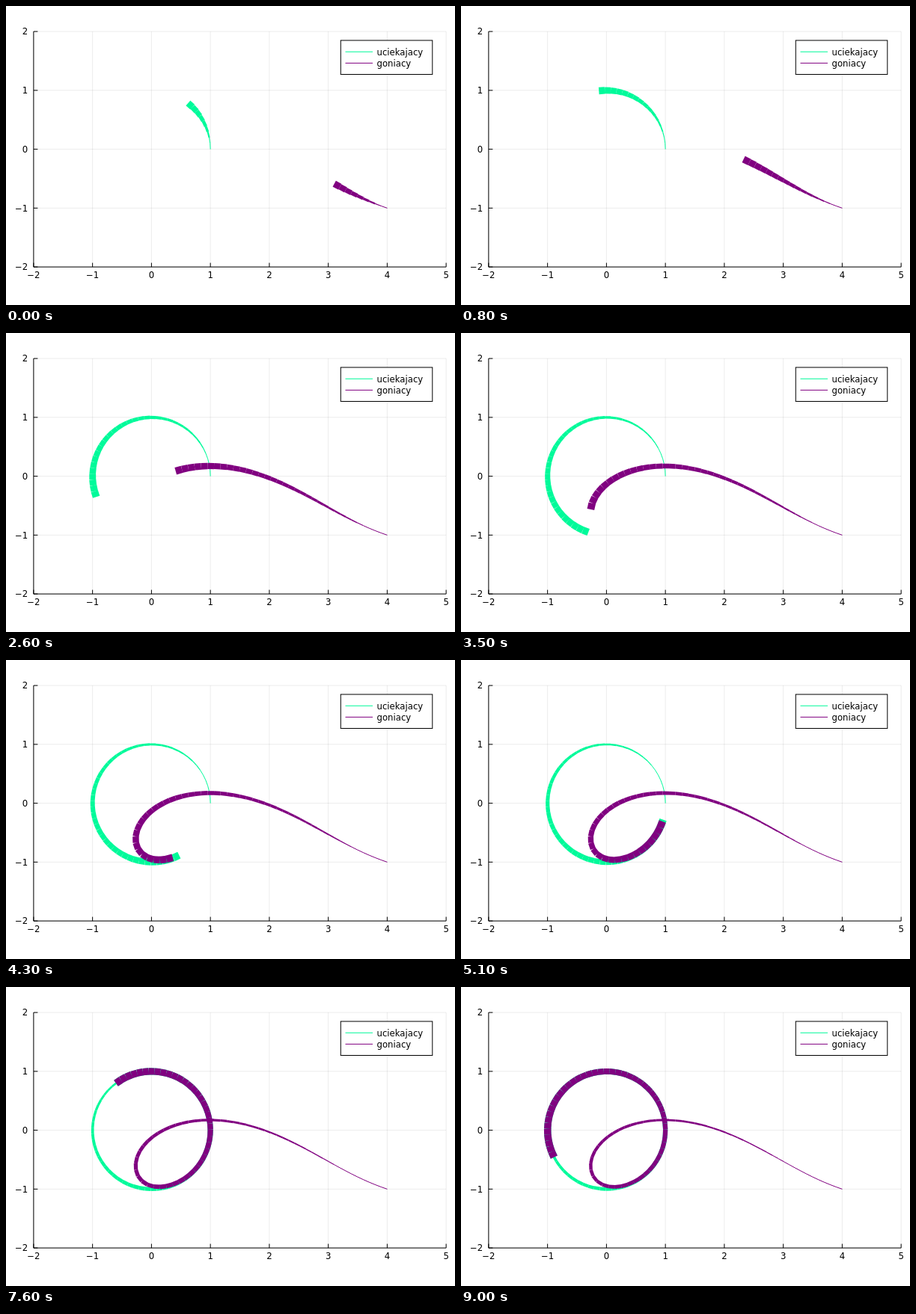
Write an HTML page that moves like this. It is 600 by 400 pixels and loops after 9100 ms.

```html
<!DOCTYPE html>
<html lang="pl">
<head>
<meta charset="utf-8">
<title>Pursuit curve</title>
<style>
  html, body { margin: 0; width: 100%; height: 100%; overflow: hidden; background: #fff; }
  svg { display: block; }
  text { font: 11.7px "DejaVu Sans", sans-serif; fill: #000; }
</style>
</head>
<body>
<svg id="stage" width="600" height="400" viewBox="0 0 600 400"></svg>
<script>
const GREEN = '#00fa9a', PURPLE = '#800080';
const UNIT = 78.75;
const FRAME_MS = 100, FRAMES = 91, FIRST_POINTS = 10;
const DT = 0.1, SPEED = 1.1, MAX_WIDTH = 10;
const stage = document.getElementById('stage');

const px = x => 194.4 + x * UNIT;
const py = y => 191.6 - y * UNIT;

function add(tag, attrs, content) {
  const el = document.createElementNS('http://www.w3.org/2000/svg', tag);
  for (const key in attrs) el.setAttribute(key, attrs[key]);
  if (content !== undefined) el.textContent = content;
  return stage.appendChild(el);
}

const line = (x1, y1, x2, y2, stroke = '#000', opacity = 1) =>
  add('line', { x1, y1, x2, y2, stroke, 'stroke-opacity': opacity });

const label = (x, y, content, anchor = 'start') =>
  add('text', { x, y, 'text-anchor': anchor }, content);

const signed = n => String(n).replace('-', '\u2212');

function drawAxes() {
  const left = px(-2), right = px(5), top = py(2), bottom = py(-2);
  for (let x = -2; x <= 5; x++) line(px(x), top, px(x), bottom, '#000', 0.08);
  for (let y = -2; y <= 2; y++) line(left, py(y), right, py(y), '#000', 0.08);
  line(left, bottom, right, bottom);
  line(left, top, left, bottom);
  for (let x = -2; x <= 5; x++) {
    line(px(x), bottom, px(x), bottom - 5.5);
    label(px(x), 364.3, signed(x), 'middle');
  }
  for (let y = -2; y <= 2; y++) {
    line(left, py(y), left + 5.5, py(y));
    label(29.3, py(y) + 4.3, signed(y), 'end');
  }
}

function drawLegend() {
  add('rect', { x: 447.3, y: 46, width: 122.5, height: 45.5, fill: '#fff', stroke: '#000' });
  [['uciekajacy', GREEN], ['goniacy', PURPLE]].forEach(([name, color], i) => {
    const y = 61.3 + 15.1 * i;
    line(453.5, y, 490, y, color);
    label(495.5, y + 4.4, name);
  });
}

const evader = t => [Math.cos(t), Math.sin(t)];

// The pursuer always heads for the evader at constant speed and sticks to it once caught.
function pursuerPath(count) {
  const substeps = 200, h = DT / substeps;
  const path = [[4, -1]];
  let [x, y] = path[0];
  for (let i = 0; i < (count - 1) * substeps; i++) {
    const [ex, ey] = evader((i + 1) * h);
    const gap = Math.hypot(ex - x, ey - y);
    const move = gap > 0 ? Math.min(1, SPEED * h / gap) : 0;
    x += (ex - x) * move;
    y += (ey - y) * move;
    if ((i + 1) % substeps === 0) path.push([x, y]);
  }
  return path;
}

const makeSegments = (path, color) => path.slice(1).map(([x, y], i) =>
  line(px(path[i][0]), py(path[i][1]), px(x), py(y), color));

const total = FIRST_POINTS + FRAMES - 1;
drawAxes();
const trails = [
  makeSegments(Array.from({ length: total }, (_, i) => evader(i * DT)), GREEN),
  makeSegments(pursuerPath(total), PURPLE)
];
drawLegend();

let shown = -1;
function render(ms) {
  const frame = Math.floor(ms / FRAME_MS) % FRAMES;
  if (frame === shown) return;
  shown = frame;
  const last = FIRST_POINTS + frame - 1;
  for (const trail of trails) {
    trail.forEach((segment, i) => {
      segment.setAttribute('visibility', i < last ? 'visible' : 'hidden');
      segment.setAttribute('stroke-width', Math.max(1, MAX_WIDTH * i / last));
    });
  }
}

const start = performance.now();
function tick() {
  render(performance.now() - start);
  requestAnimationFrame(tick);
}
tick();
</script>
</body>
</html>
```
